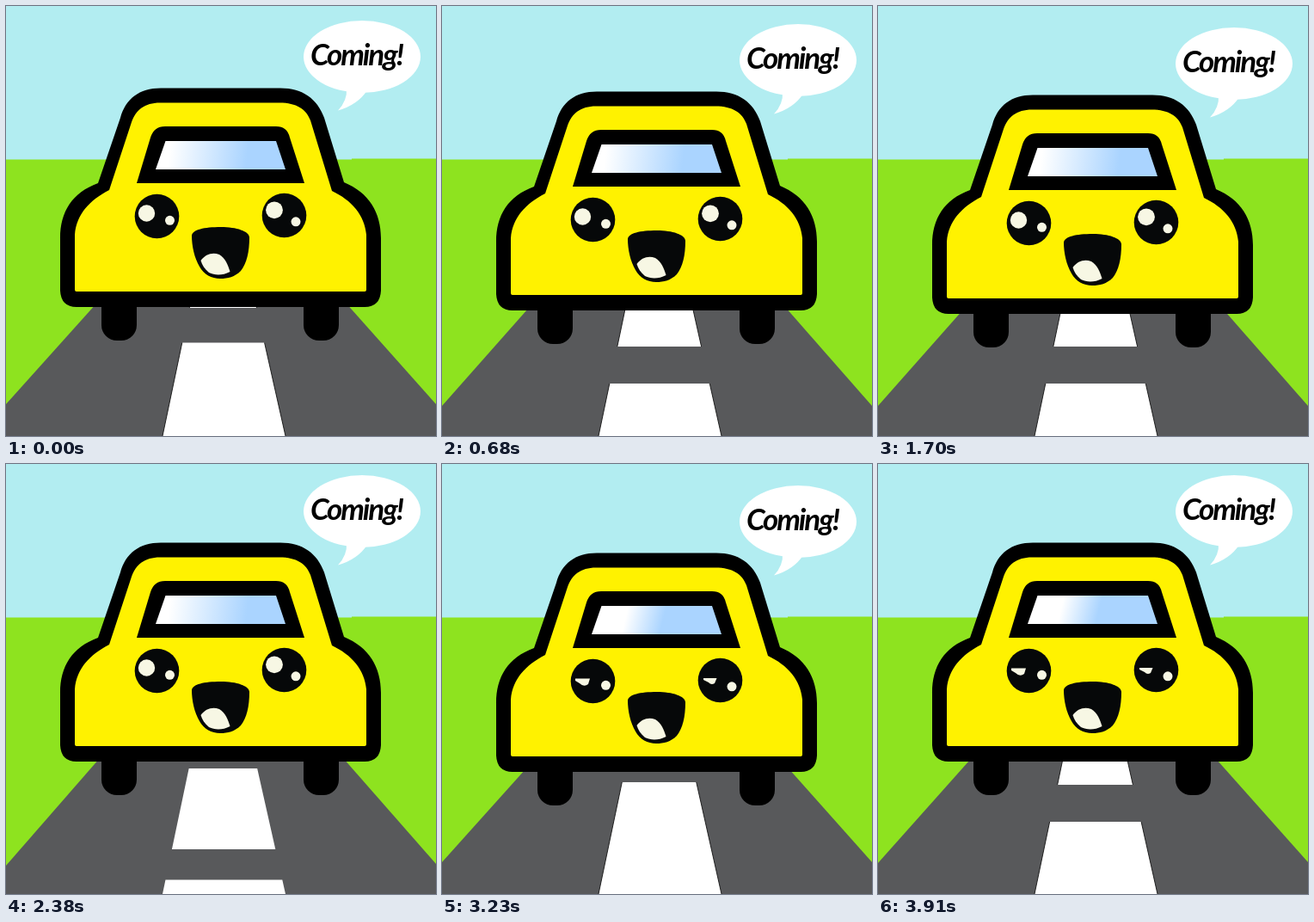
Animation of 500 by 500 pixels, one loop 4080 ms. Source, as an HTML page:

```html
<!DOCTYPE html>
<html lang="en">
<head>
<meta charset="utf-8">
<title>Little yellow car</title>
<style>
  html, body { margin: 0; width: 100%; height: 100%; overflow: hidden; }
  svg { display: block; width: 100vw; height: 100vh; }
  text { font: italic 700 35px Lato, "Open Sans", sans-serif; letter-spacing: -.06em; }
</style>
</head>
<body>
<svg viewBox="0 0 500 500">
  <defs>
    <linearGradient id="glass" gradientUnits="userSpaceOnUse" x1="190" y1="168" x2="280" y2="178">
      <stop stop-color="#fff"/><stop offset="1" stop-color="#aad4ff"/>
    </linearGradient>
  </defs>
  <rect width="500" height="500" fill="#b2edf1"/>
  <path d="M0 178.500H402V177.500H500V500H0Z" fill="#8ee31f"/>
  <path id="road" fill="#58595b"/>
  <path id="dashes" fill="#fff"/>
  <path id="rims" fill="none" stroke="#111" stroke-width=".9"/>

  <g id="ride">
    <rect x="111" y="325" width="41" height="64" rx="18"/>
    <rect x="346" y="325" width="41" height="64" rx="18"/>
    <path d="M63 331V270C63 239 77 217 107 206L133 130C139 108 155 95.500 180 95.500H319C345 95.500 362 108 370 130L393 205C422 217 436 240 436 270V331Q435 350 417 350H82Q64 350 63 331Z"/>
    <path fill="#fff200" d="M80 330V266C82 242 97 226 120 214L146 135C151 121 161 112.500 179 112.500H318C338 112.500 349 120 354 133L379 215C402 226 417 243 419 266V330Q419 332 417 332H82Q80 332 80 330Z"/>
    <path d="M152 206L168 153Q172 140 185 140H314Q327 140 330 153L347 206Z"/>
    <path fill="url(#glass)" d="M174 190L185.500 157H314L325 190Z"/>

    <g fill="#060809">
      <circle cx="175.500" cy="244.500" r="25.800"/>
      <circle cx="323.500" cy="243.500" r="25.800"/>
    </g>
    <g fill="#f7f7e4">
      <circle cx="190.500" cy="249.300" r="5.500"/>
      <circle cx="337" cy="250.800" r="5.500"/>
      <g id="awake">
        <circle cx="163.500" cy="241" r="9.700"/>
        <circle cx="312" cy="237.300" r="9.900"/>
      </g>
      <g id="sly">
        <path d="M155 241.500H172L170 248Q165 252 160 247L155 244Z"/>
        <path d="M304 241H319.500L317 247Q313 249.500 310 246L304 243Z"/>
      </g>
    </g>

    <path fill="#060809" d="M216 267C217 260 230 257 250 257C268 257 283 262 283 269C283 286 280 299 273 308C266 315 258 317 249 317C239 317 230 312 225 303C219 293 216 279 216 267Z"/>
    <path fill="#f7f7e4" d="M226.500 296C232 288.500 240 286 248 289C255 293 258 301 260.500 309C252 313.500 243 313.500 236 310C231 306 228 301 226.500 296Z"/>

    <g fill="#fff">
      <ellipse cx="414" cy="59" rx="68" ry="42"/>
      <path d="M396 96Q397 110 386 121.500Q409 115 420 98Z"/>
    </g>
    <text x="354" y="68.500">Coming!</text>
  </g>
</svg>
<script>
const $ = id => document.getElementById(id);
const STEP = 170, COUNT = 24;
const BOB = [0, 4, 8, 8, 4, 0, -4, -4];
// [top, bottom] of each stripe, per road phase
const STRIPES = [
  [[370, 500]],
  [[330, 351], [391.5, 500]],
  [[330, 373], [416, 500]],
  [[330, 396], [439, 500]],
  [[335, 422], [461, 500]],
  [[354, 448], [483.5, 500]]
];
const leftX = y => 182 + (500 - y) * 0.21;
const rightX = y => 325 - (500 - y) * 0.225;

function stripe([top, end]) {
  return `M${leftX(top)} ${top}H${rightX(top)}L${rightX(end)} ${end}H${leftX(end)}Z`;
}
function rim([top, end]) {
  return `M${leftX(top)} ${top}L${leftX(end)} ${end}M${rightX(top)} ${top}L${rightX(end)} ${end}`;
}

function draw(time) {
  const i = Math.floor(time % (STEP * COUNT) / STEP);
  const phase = (1 - i + COUNT) % 6;
  const left = 463 + Math.max(0, phase - 1);
  const right = phase > 2 ? 465 : 463;
  const sly = i >= 19;

  $("road").setAttribute("d", `M0 500V${left}L123 326H378L500 ${right}V500Z`);
  $("dashes").setAttribute("d", STRIPES[phase].map(stripe).join(""));
  $("rims").setAttribute("d", phase < 4 ? STRIPES[phase].map(rim).join("") : "");

  $("ride").setAttribute("transform", `translate(0 ${BOB[i % 8]})`);
  $("awake").style.display = sly ? "none" : "";
  $("sly").style.display = sly ? "" : "none";
  $("glass").setAttribute("x1", sly ? 214 : 190);
  $("glass").setAttribute("x2", sly ? 256 : 280);
}

const start = performance.now();
function tick() {
  draw(performance.now() - start);
  requestAnimationFrame(tick);
}
tick();
</script>
</body>
</html>
```
